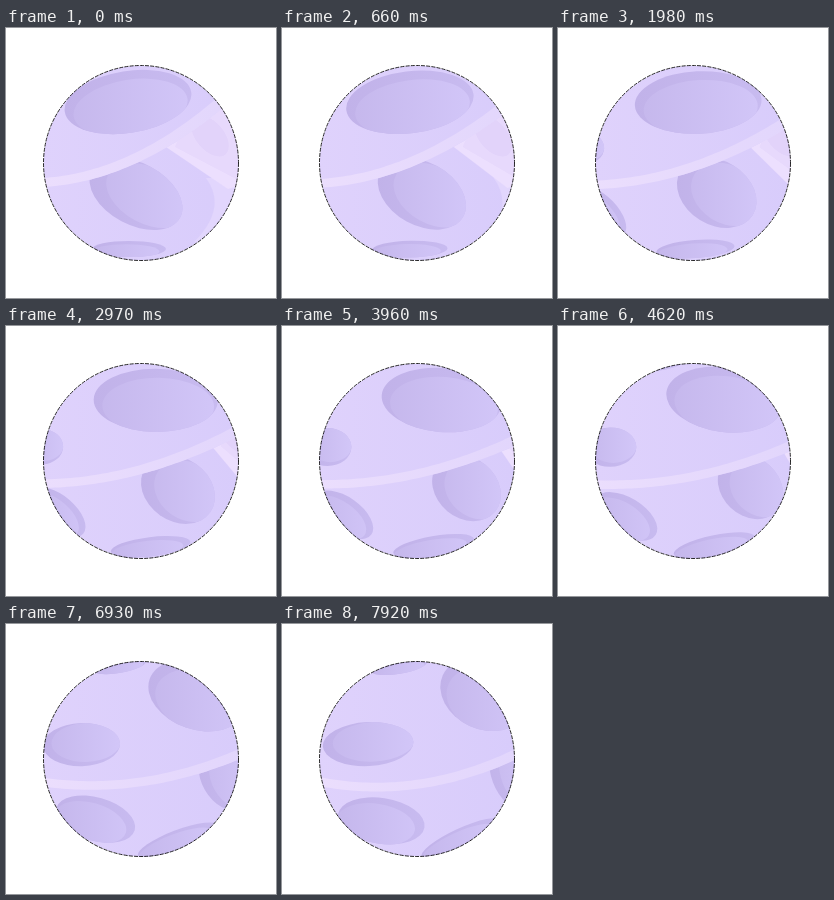
Animation of 270x270 px, one loop 8000 ms. Source, as an HTML page with a canvas:

```html
<!DOCTYPE html>
<html lang="en">
<head>
<meta charset="utf-8">
<title>Turning planet</title>
<style>
html, body { margin: 0; width: 100%; height: 100%; overflow: hidden; background: #fff; }
canvas { display: block; width: 100vw; height: 100vh; object-fit: contain; }
</style>
</head>
<body>
<canvas width="270" height="270"></canvas>
<script>
const ctx = document.querySelector('canvas').getContext('2d');
const LOOP = 8000, STEP = 330, CENTER = 135, RADIUS = 97.5;

// Each pose is [x, y, rx, ry, degrees] at the start, middle and end of the turn.
// The floor of a crater is moved by a share of its radii, which leaves a dark rim.
const craters = [
  { floor: [0.04, 0.18], poses: [[122, 74, 64, 31, -9], [160, 74, 60, 32, 5], [203, 70, 45, 35, 25]] },
  { floor: [0.24, 0.05], poses: [[130, 166, 50, 31, 28], [185, 162, 37, 30, 40], [228, 152, 33, 17, 70]] },
  { floor: [-0.08, 0.3], poses: [[123, 221, 37, 8, 0], [152, 220, 41, 10, -10], [180, 215, 44, 11, -25]] },
  { floor: [-0.12, 0.15], poses: [[27, 178, 30, 12, 55], [62, 189, 34, 18, 35], [100, 197, 44, 23, 8]] },
  { floor: [0.12, -0.1], poses: [[10, 118, 18, 12, 0], [46, 121, 24, 19, 0], [87, 120, 46, 22, -3]] },
  { floor: [0, 0.3], poses: [[100, 15, 10, 3, -12], [106, 36, 20, 5, -12], [117, 42, 29, 8, -9]] }
];

// Smooth curve through three values at 0, 0.5 and 1.
const blend = (a, b, c, s) => a + (4 * b - 3 * a - c) * s + 2 * (a - 2 * b + c) * s * s;
const pose = ([a, b, c], s) => a.map((value, i) => blend(value, b[i], c[i], s));

function gradient(x0, x1, from, to) {
  const g = ctx.createLinearGradient(x0, 0, x1, 0);
  g.addColorStop(0, from);
  g.addColorStop(1, to);
  return g;
}

function fill(path, color) {
  ctx.fillStyle = color;
  ctx.fill(path);
}

function clipped(path, paint) {
  ctx.save();
  ctx.clip(path);
  paint();
  ctx.restore();
}

function polygon(...points) {
  const path = new Path2D();
  points.forEach(([x, y]) => path.lineTo(x, y));
  path.closePath();
  return path;
}

function oval(x, y, rx, ry, degrees) {
  const path = new Path2D();
  path.ellipse(x, y, rx, ry, degrees * Math.PI / 180, 0, 2 * Math.PI);
  return path;
}

function drawCrater({ floor, poses }, s) {
  const [x, y, rx, ry, tilt] = pose(poses, s);
  const outer = oval(x, y, rx, ry, tilt);
  fill(outer, gradient(x - rx, x + rx, '#c1b2e9', '#c8bbf0'));
  clipped(outer, () => {
    const inner = oval(x + floor[0] * rx, y + floor[1] * ry, rx * 0.9, ry * 0.9, tilt);
    fill(inner, gradient(x - rx, x + rx, '#c5b7ec', '#d2c6f8'));
  });
}

// The band's edges are parabolas given by their heights at the left, middle and right.
function edge([left, middle, right]) {
  return Array.from({ length: 50 }, (_, i) => {
    const u = (i - 24.5) / 24.5;
    const y = middle + (right - left) / 2 * u + ((left + right) / 2 - middle) * u * u;
    return [CENTER + u * 98, y];
  });
}

function drawRidge(s) {
  const [ax, ay, bx, by] = pose([[160, 119, 222, 161], [217, 121, 240, 155], [240, 128, 250, 150]], s);
  const shift = ax - 160;
  const slope = new Path2D(`M${200 + shift} 150Q${222 + shift} 180 ${188 + shift} 214L300 240V150Z`);
  fill(slope, '#e2d6fd');
  fill(polygon([ax, ay], [bx, by], [260, 150], [260, 40], [ax + 40, 40]), '#ecdffe');
  const face = polygon([ax + 9, ay], [bx + 10, by - 9], [260, 140], [260, 40], [ax + 40, 40]);
  fill(face, '#e7d9fc');
  clipped(face, () => fill(oval(204 + shift * 0.6, 108, 24, 14, 50), '#e2d3fa'));
}

function draw(now) {
  const s = Math.floor(now % LOOP / STEP) * STEP / LOOP;
  const disc = oval(CENTER, CENTER, RADIUS, RADIUS, 0);
  const lower = edge(pose([[159, 133, 66], [162.5, 152.5, 120], [162, 165, 136]], s));
  const upper = edge(pose([[150, 122, 50], [154, 143.5, 109], [153, 156, 125]], s));
  const south = polygon(...lower, [233, 240], [37, 240]);

  ctx.fillStyle = '#fff';
  ctx.fillRect(0, 0, 270, 270);
  clipped(disc, () => {
    fill(disc, gradient(38, 232, '#dfd2fc', '#d8ccfb'));
    const [, right, ...others] = craters;
    [craters[0], ...others].forEach(crater => drawCrater(crater, s));
    clipped(south, () => {
      drawCrater(right, s);
      drawRidge(s);
    });
    fill(polygon(...lower, ...upper.reverse()), gradient(38, 232, '#ebdefd', '#e2d6fc'));
  });

  ctx.strokeStyle = '#111';
  ctx.lineWidth = 0.9;
  ctx.setLineDash([4, 1.2]);
  ctx.stroke(disc);
  requestAnimationFrame(draw);
}
requestAnimationFrame(draw);
</script>
</body>
</html>
```
